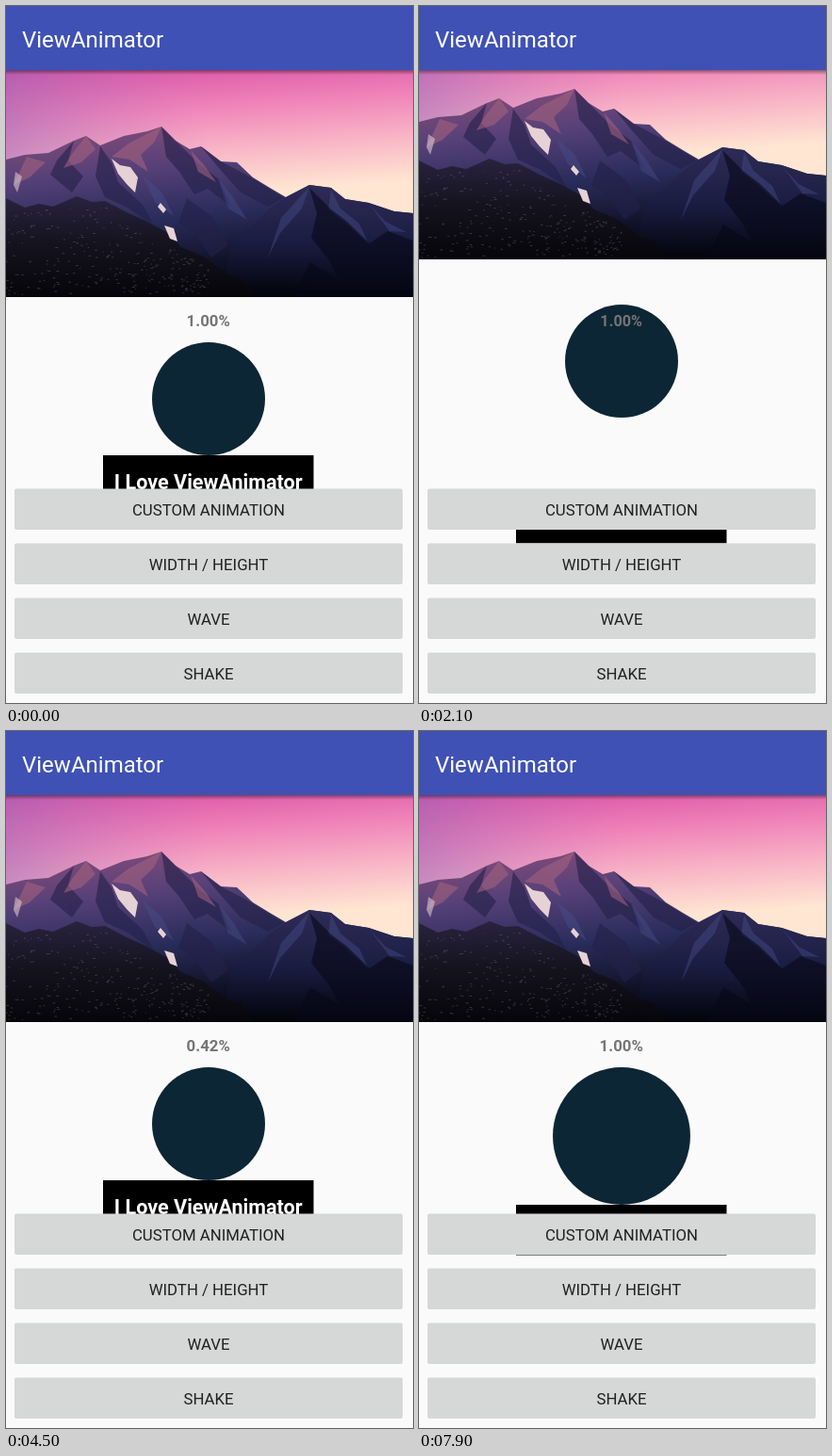
Recreate the animation shown at these times as an HTML page. Size 432x740 px, loop 8000 ms.

```html
<!DOCTYPE html>
<html lang="en">
<head>
<meta charset="utf-8">
<title>ViewAnimator</title>
<style>
  html, body { margin: 0; width: 100%; height: 100%; overflow: hidden; background: #fafafa; }
  svg { display: block; width: 432px; height: 740px; }
  text { font-family: Roboto, sans-serif; font-size: 16.8px; }
  .middle { text-anchor: middle; }
  .bold { font-weight: 700; }
</style>
</head>
<body>
<svg viewBox="0 0 432 740">
  <defs>
    <linearGradient id="sky" x2=".12" y2="1">
      <stop offset="0" stop-color="#d94fa5"/>
      <stop offset=".22" stop-color="#f084b9"/>
      <stop offset=".4" stop-color="#f8b4c6"/>
      <stop offset=".6" stop-color="#ffe6d2"/>
    </linearGradient>
    <linearGradient id="haze">
      <stop offset="0" stop-color="#9668b8" stop-opacity=".5"/>
      <stop offset=".5" stop-color="#c07ac0" stop-opacity="0"/>
    </linearGradient>
    <linearGradient id="rock" x2=".25" y2="1">
      <stop offset="0" stop-color="#8b4d79"/>
      <stop offset=".3" stop-color="#574178"/>
      <stop offset=".6" stop-color="#292c5a"/>
      <stop offset="1" stop-color="#05050f"/>
    </linearGradient>
    <linearGradient id="slope" x2="0" y2="1">
      <stop offset="0" stop-color="#2f2b57"/>
      <stop offset=".5" stop-color="#1a1d42"/>
      <stop offset="1" stop-color="#03030a"/>
    </linearGradient>
    <linearGradient id="front" x2="0" y2="1">
      <stop offset="0" stop-color="#29233f"/>
      <stop offset=".45" stop-color="#15131f"/>
      <stop offset="1" stop-color="#060509"/>
    </linearGradient>
    <linearGradient id="shade" x2="0" y2="1">
      <stop offset="0" stop-opacity=".4"/>
      <stop offset="1" stop-opacity="0"/>
    </linearGradient>
    <clipPath id="photo"><rect y="68" width="432" height="241"/></clipPath>
  </defs>

  <g id="mountain"><g clip-path="url(#photo)">
    <rect y="68" width="432" height="241" fill="url(#sky)"/>
    <rect y="68" width="432" height="241" fill="url(#haze)"/>
    <path fill="url(#rock)" d="M0 163 20 158 45 156 72 143 85 138 100 148 125 138 150 133 165 128 180 143 195 152 207 149 228 165 245 166 262 182 280 193 297 203 322 190 345 193 360 205 385 209 412 218 432 220V309H0z"/>
    <path fill="url(#slope)" d="M432 220 412 218 385 209 360 205 345 193 322 190 297 203 281 214 258 236 239 252 228 309H432z"/>
    <g fill="#232049" opacity=".6">
      <path d="M165 128 180 143 205 168 226 184 240 214 214 194 200 200 184 176 170 160z"/>
      <path d="M72 143 66 164 82 181 70 198 47 179 54 164z"/>
      <path d="M100 149 112 166 119 187 145 211 157 233 129 214 105 203 95 181z"/>
      <path d="M207 149 228 165 262 183 295 204 278 213 249 198 225 171z"/>
      <path d="M192 204 219 224 236 254 218 267 199 241 183 230z"/>
    </g>
    <g fill="#a8647f" opacity=".55">
      <path d="M85 138 95 152 80 166 61 172 70 157z"/>
      <path d="M165 128 157 145 143 158 151 176 131 163 112 160 130 146z"/>
      <path d="M196 153 211 170 223 187 204 176z"/>
      <path d="M22 160 42 166 25 182 8 190z"/>
    </g>
    <g fill="#4a518f" opacity=".4">
      <path d="M322 192 314 215 291 241 278 267 292 225z"/>
      <path d="M345 195 355 215 375 231 385 253 361 231 342 216z"/>
      <path d="M145 180 165 197 178 223 158 208z"/>
      <path d="M225 183 241 203 256 227 236 215z"/>
      <path d="M386 211 403 229 425 240 407 239z"/>
    </g>
    <path fill="#080817" opacity=".6" d="M322 193 330 220 324 246 343 270 355 292 323 272 305 309H432V249L405 239 386 252 361 228 345 216z"/>
    <path fill="url(#front)" d="M0 204 20 214 35 210 50 213 75 202 91 208 105 207 130 220 148 228 170 240 186 256 210 266 235 285 249 289 264 309H0z"/>
    <g id="specks" fill="#8d8495" opacity=".32"></g>
    <g fill="#e6d2d5">
      <path d="M112 162 121 169 132 171 140 182 137 198 128 189 119 178z"/>
      <path d="M164 209 170 216 167 220 161 213z"/>
      <path d="M168 233 178 236 182 250 174 247z"/>
      <path d="M10 176 17 181 12 198 8 190z" opacity=".55"/>
    </g>
  </g></g>

  <g id="banner">
    <rect x="103" y="477" width="223.5" height="53.5"/>
    <text class="middle bold" x="214.7" y="512.5" fill="#fff" style="font-size:21.6px">I Love ViewAnimator</text>
  </g>
  <circle id="badge" cx="215" cy="417" r="60" fill="#0d2636"/>
  <text id="percent" class="middle bold" y="6" fill="#757575">1.00%</text>
  <g id="buttons"></g>

  <rect y="68" width="432" height="5" fill="url(#shade)"/>
  <rect width="432" height="68" fill="#3f51b5"/>
  <text x="17" y="44" fill="#fff" style="font-size:24px">ViewAnimator</text>
</svg>
<script>
const LOOP = 8000, STEP = 100;
const DROP = { from: 616, length: 1815, distance: 1200 };
const COUNT = { from: 2430, length: 4610 };
// Badge diameter: time, size
const SIZES = [[7600, 120], [7700, 160], [7800, 212], [7900, 146], [8000, 120]];

const el = id => document.getElementById(id);
const clamp = v => Math.min(1, Math.max(0, v));
const progress = (t, { from, length }) => clamp((t - from) / length);
const shiftY = (id, y) => el(id).setAttribute('transform', `translate(0 ${y})`);

function sizeAt(t) {
  const next = SIZES.findIndex(([time]) => time > t);
  if (next < 1) return 120;
  const [t0, a] = SIZES[next - 1], [t1, b] = SIZES[next];
  return a + (b - a) * (t - t0) / (t1 - t0);
}

function build() {
  el('buttons').innerHTML = ['CUSTOM ANIMATION', 'WIDTH / HEIGHT', 'WAVE', 'SHAKE'].map((label, i) => {
    const y = 512.4 + i * 58;
    return `<rect x="9" y="${y}" width="412" height="43.6" rx="2" fill="#d6d7d7"/>
      <text class="middle" x="215" y="${y + 28.6}" fill="#212121">${label}</text>`;
  }).join('');

  let seed = 7;
  const random = () => (seed = seed * 16807 % 2147483647) / 2147483647;
  let specks = '';
  for (let i = 0; i < 260; i++) {
    const x = random() * 215, top = 214 + Math.max(0, x - 110) * 0.62;
    const y = top + random() * (306 - top), w = 1 + random() * 2;
    specks += `M${x.toFixed(1)} ${y.toFixed(1)}h${w.toFixed(1)}v1h-${w.toFixed(1)}z`;
  }
  el('specks').innerHTML = `<path d="${specks}"/>`;
}

function draw(t) {
  const dropping = t >= 500;
  const left = dropping ? (1 - progress(t, DROP)) ** 2 : 0;
  const offset = DROP.distance * left;
  const size = sizeAt(t);
  shiftY('mountain', -offset);
  shiftY('badge', -offset);
  shiftY('banner', offset + size - 120);
  el('badge').setAttribute('r', size / 2);
  el('badge').setAttribute('cy', 357 + size / 2);

  const value = t < COUNT.from ? 1 : (1 - Math.cos(Math.PI * progress(t, COUNT))) / 2;
  el('percent').textContent = value.toFixed(2) + '%';
  el('percent').setAttribute('transform', `translate(214.7 334) scale(${1 - left})`);
}

build();
const start = performance.now();
function tick() {
  const t = (performance.now() - start) % LOOP;
  draw(Math.floor(t / STEP) * STEP);
  requestAnimationFrame(tick);
}
tick();
</script>
</body>
</html>
```
